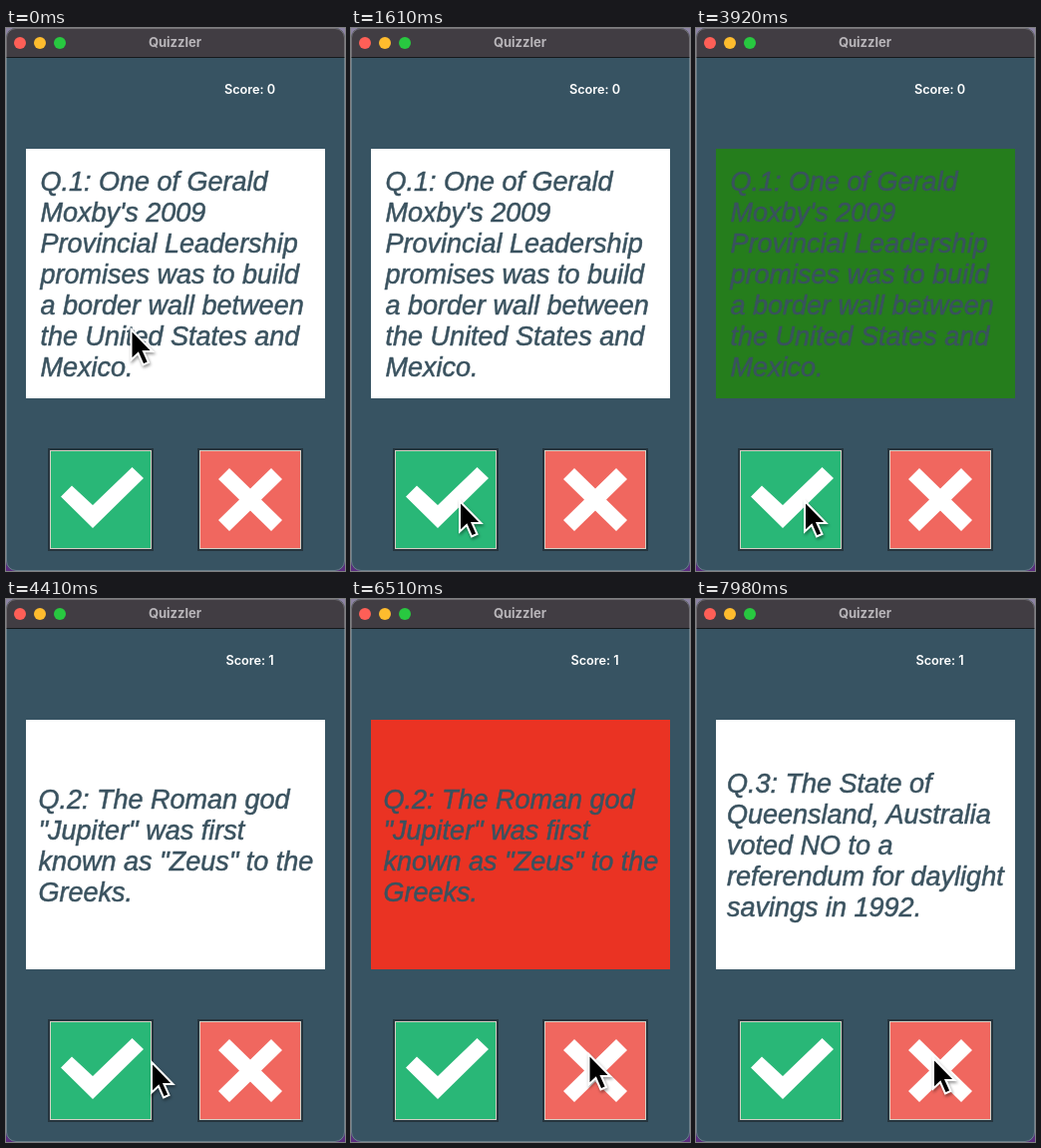
An HTML page for the animation above (8 s loop, 340 by 544 pixels).

```html
<!DOCTYPE html>
<html lang="en">
<head>
<meta charset="utf-8">
<title>Quizzler</title>
<style>
  html, body { margin: 0; width: 100%; height: 100%; overflow: hidden; }
  body { background: linear-gradient(#8d84a3, #5b2c80); }
  svg { display: block; width: 100%; height: 100%; }
  .ui { font-family: Inter, "Liberation Sans", sans-serif; font-size: 13px; text-anchor: middle; }
  #score { font-size: 12.7px; font-weight: 600; fill: #fff; }
  #question {
    font: italic 27px "Liberation Sans", Arial, sans-serif;
    fill: #3a525f; stroke: #3a525f; stroke-width: .5px;
  }
  #pointer { filter: drop-shadow(1px 2px 1.5px rgba(0, 0, 0, .4)); }
</style>
</head>
<body>
<svg viewBox="0 0 340 544">
  <defs>
    <clipPath id="window"><rect width="340" height="544" rx="10"/></clipPath>
    <g id="frame">
      <rect width="106" height="103" fill="#26353e"/>
      <rect x="2" y="2" width="102" height="99" fill="#d5cfc4"/>
      <rect x="3" y="3" width="100" height="97" fill="currentColor"/>
    </g>
  </defs>
  <g clip-path="url(#window)">
    <rect width="340" height="544" fill="#375362"/>
    <rect width="340" height="29" fill="#413d43"/>
    <rect y="29" width="340" height="1" fill="#15191c"/>
    <circle cx="14" cy="15" r="6" fill="#fe5f57"/>
    <circle cx="34" cy="15" r="6" fill="#febc2e"/>
    <circle cx="54" cy="15" r="6" fill="#28c840"/>
    <text class="ui" x="169.5" y="19" font-weight="700" fill="#b9b6ba">Quizzler</text>
    <text class="ui" id="score" x="244.5" y="66"></text>
  </g>
  <rect x=".5" y=".5" width="339" height="543" rx="9.5" fill="none" stroke="#fff" stroke-opacity=".25"/>
  <rect id="card" x="20" y="121" width="300" height="250" fill="#fff"/>
  <g id="question"></g>

  <g transform="translate(42 421)" color="#29b777">
    <use href="#frame"/>
    <path id="yes" fill="#fff" d="M13 48.500 24 37.500 45 57 84.500 19 96 30 45 80Z"/>
  </g>
  <g transform="translate(192 421)" color="#f0675f">
    <use href="#frame"/>
    <path id="no" fill="#fff" d="M21 31 32 20 53 40.500 74 20 85 31 64 51.500 85 72 74 83 53 62.500 32 83 21 72 42 51.500Z"/>
  </g>

  <circle id="ring" r="21.500" fill="none" stroke="#4f92d6" stroke-width="2.500"/>
  <path id="pointer" d="M0 0V30.500L7 24 12 35.500 17.500 33 12.500 22H21.500Z"
        fill="#000" stroke="#fff" stroke-width="2"/>
</svg>
<script>
const LOOP = 8000, STEP = 70;
const $ = id => document.getElementById(id);

const questions = [
  { at: 0, score: 0, x: 34.5, lines: ["Q.1: One of Gerald", "Moxby's 2009", "Provincial Leadership",
    "promises was to build", "a border wall between", "the United States and", "Mexico."] },
  { at: 4410, score: 1, x: 32.5, lines: ["Q.2: The Roman god", "\"Jupiter\" was first",
    "known as \"Zeus\" to the", "Greeks."] },
  { at: 7070, score: 1, x: 31, lines: ["Q.3: The State of", "Queensland, Australia",
    "voted NO to a", "referendum for daylight", "savings in 1992."] }
];

// Each answer: press, release, then feedback colour until the next question
const clicks = [
  { button: "yes", down: 3220, up: 3360, next: 4410, tint: "#257d1c", x: 109, y: 475 },
  { button: "no", down: 5880, up: 6020, next: 7070, tint: "#ea3323", x: 239, y: 456 }
];

// Pointer stops: time, x, y
const path = [
  [0, 125.5, 302], [840, 116, 441], [1120, 112, 467], [1610, 109, 474],
  [3920, 109, 474], [4270, 143, 465], [4410, 146, 464], [5180, 236, 457],
  [5250, 238.5, 456], [6650, 238.5, 456], [6930, 198, 465], [7210, 192, 466],
  [7420, 194, 466], [7840, 237, 460], [7980, 238, 460]
];

function pointerAt(t) {
  const i = path.findIndex(p => p[0] > t);
  if (i < 0) return path[path.length - 1].slice(1);
  const [t0, x0, y0] = path[i - 1], [t1, x1, y1] = path[i];
  const k = (t - t0) / (t1 - t0), e = k * k * (3 - 2 * k);
  return [x0 + (x1 - x0) * e, y0 + (y1 - y0) * e];
}

let shown = null;
function showQuestion(q) {
  if (q === shown) return;
  shown = q;
  $("score").textContent = "Score: " + q.score;
  const top = 271.5 - 15.5 * q.lines.length;
  $("question").replaceChildren(...q.lines.map((line, i) => {
    const el = document.createElementNS("http://www.w3.org/2000/svg", "text");
    el.setAttribute("x", q.x);
    el.setAttribute("y", top + 31 * i);
    el.textContent = line;
    return el;
  }));
}

function draw(now) {
  const t = Math.floor(now % LOOP / STEP) * STEP;
  showQuestion(questions.filter(q => q.at <= t).pop());

  let tint = "#fff", ringAlpha = 0;
  for (const c of clicks) {
    const pressed = t >= c.down && t < c.up;
    $(c.button).setAttribute("transform", pressed ? "translate(1 1)" : "");
    if (t >= c.up && t < c.next) tint = c.tint;
    if (t >= c.down && t < c.up + STEP) {
      ringAlpha = pressed ? 0.65 : 0.3;
      $("ring").setAttribute("cx", c.x);
      $("ring").setAttribute("cy", c.y);
    }
  }
  $("card").setAttribute("fill", tint);
  $("ring").setAttribute("opacity", ringAlpha);
  $("pointer").setAttribute("transform", `translate(${pointerAt(t)})`);
}

const start = performance.now();
function tick() {
  draw(performance.now() - start);
  requestAnimationFrame(tick);
}
tick();
</script>
</body>
</html>
```
